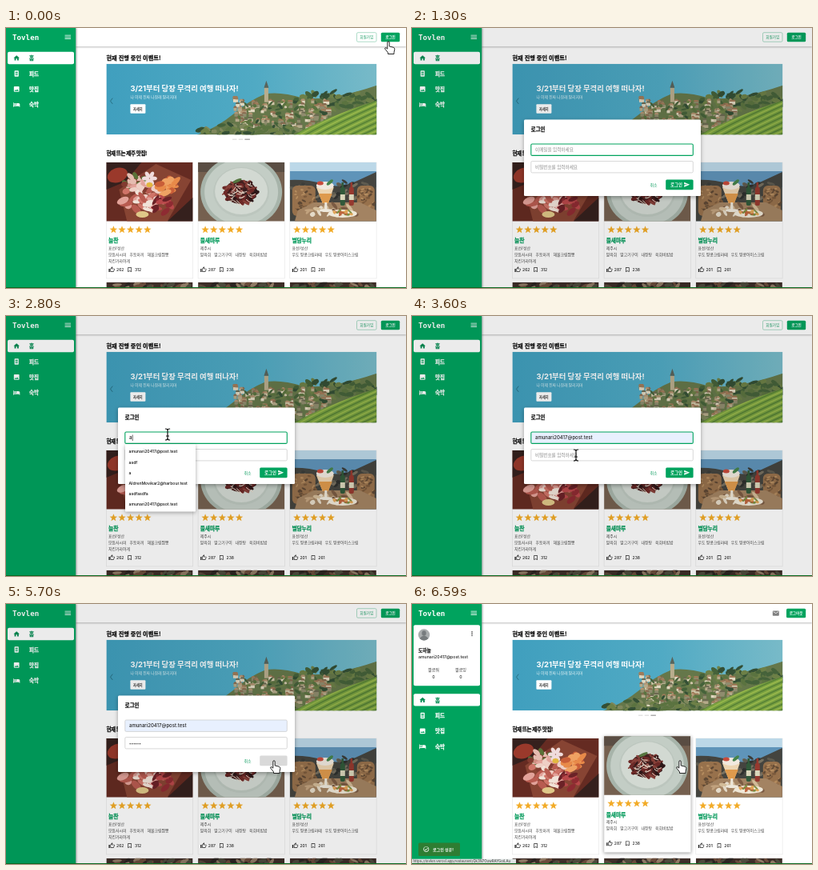
Write an HTML page that moves like this. It is 500 by 325 pixels and loops after 6.78 s.

```html
<!DOCTYPE html>
<html lang="ko">
<head>
<meta charset="utf-8">
<style>
html, body { margin: 0; width: 100%; height: 100%; overflow: hidden; background: #fff; }
svg { display: block; }
text { font-family: Inter, "Noto Sans CJK KR", "Noto Sans CJK", sans-serif; font-weight: 500; white-space: pre; }
.b { font-weight: 700; }
.k { font-family: "Noto Sans CJK KR", "Noto Sans CJK", sans-serif; font-weight: 900; stroke: currentColor; stroke-width: .25; }
.tight { letter-spacing: -.5px; }
.logo { font-family: "DejaVu Sans Mono", monospace; font-weight: 700; }
</style>
</head>
<body>
<svg id="stage" width="500" height="325" viewBox="0 0 500 325"></svg>
<script>
const LOOP = 6780, GREEN = '#00a35e';
const EMAIL = 'amunari20417@post.test';

const ICON = {
  home: 'M10 20v-6h4v6h5v-8h3L12 3 2 12h3v8z',
  feed: 'M7 2h10a2 2 0 0 1 2 2v16a2 2 0 0 1-2 2H7a2 2 0 0 1-2-2V4a2 2 0 0 1 2-2zM8 6v4h8V6zM8 12v2h8v-2zM8 16v2h8v-2z',
  image: 'M21 19V5a2 2 0 0 0-2-2H5a2 2 0 0 0-2 2v14a2 2 0 0 0 2 2h14a2 2 0 0 0 2-2zM8.5 13.5l2.5 3 3.5-4.5 4.5 6H5z',
  bed: 'M7 13a3 3 0 1 0 0-6 3 3 0 0 0 0 6zm12-6h-8v7H3V5H1v15h2v-3h18v3h2v-9a4 4 0 0 0-4-4z',
  menu: 'M3 18h18v-2H3zm0-5h18v-2H3zm0-7v2h18V6z',
  send: 'M2 21L23 12 2 3v7l15 2-15 2z',
  mail: 'M20 4H4a2 2 0 0 0-2 2v12a2 2 0 0 0 2 2h16a2 2 0 0 0 2-2V6a2 2 0 0 0-2-2zm0 4l-8 5-8-5V6l8 5 8-5z',
  mark: 'M17 3H7a2 2 0 0 0-2 2v16l7-3 7 3V5a2 2 0 0 0-2-2zm0 15l-5-2.2L7 18V5h10z',
  thumb: 'M9 21h9c.8 0 1.5-.5 1.8-1.2l3-7.1c.1-.2.2-.5.2-.7v-2a2 2 0 0 0-2-2h-6.3l.9-4.6c.1-.5 0-1-.4-1.4L14.2 1 7.6 7.6C7.2 8 7 8.5 7 9v10a2 2 0 0 0 2 2zM9 9l4.3-4.3L12 10h9v2l-3 7H9zM1 9h4v12H1z',
  more: 'M12 4a2 2 0 1 0 .1 0zM12 10a2 2 0 1 0 .1 0zM12 16a2 2 0 1 0 .1 0z',
  check: 'M12 2a10 10 0 1 0 .1 0zM12 4a8 8 0 1 1-.1 0zM16.6 7.6L10 14.2l-2.6-2.6L6 13l4 4 8-8z'
};

// Markup helpers
const rect = (x, y, w, h, fill, more = '') => `<rect x="${x}" y="${y}" width="${w}" height="${h}" fill="${fill}" ${more}/>`;
const text = (x, y, size, str, fill = '#222', more = '') => `<text x="${x}" y="${y}" font-size="${size}" fill="${fill}" color="${fill}" ${more}>${str}</text>`;
const path = (d, fill, more = '') => `<path d="${d}" fill="${fill}" ${more}/>`;
const oval = (x, y, rx, ry, fill, turn = 0) => `<ellipse cx="${x}" cy="${y}" rx="${rx}" ry="${ry}" fill="${fill}" transform="rotate(${turn} ${x} ${y})"/>`;
const line = (d, color, w) => path(d, 'none', `stroke="${color}" stroke-width="${w}" stroke-linecap="round"`);
const icon = (name, x, y, size, fill) => path(ICON[name], fill, `fill-rule="evenodd" transform="translate(${x} ${y}) scale(${size / 24})"`);
const group = (id, body) => `<g id="${id}">${body}</g>`;
const crop = (x, y, w, h, body) => `<svg x="${x}" y="${y}" width="${w}" height="${h}">${body}</svg>`;
const many = (n, fn) => Array.from({ length: n }, (_, i) => fn(i)).join('');
const B = 'class="b"', K = 'class="k"', MID = ' text-anchor="middle"';

let seed = 17;
const rnd = (a, b) => {
  seed = (seed * 16807) % 2147483647;
  return +(a + (b - a) * seed / 2147483647).toFixed(1);
};
const pick = list => list[Math.floor(rnd(0, list.length - .1))];

// Loose blobs scattered inside an ellipse
const scatter = (n, cx, cy, rx, ry, size, colors) => many(n, () => {
  const a = rnd(0, 6.28), d = Math.sqrt(rnd(0, 1));
  return oval(+(cx + rx * d * Math.cos(a)).toFixed(1), +(cy + ry * d * Math.sin(a)).toFixed(1),
    rnd(size * .6, size * 1.3), rnd(size * .3, size * .6), pick(colors), rnd(-60, 60));
});

const LEAVES = ['#45623a', '#5b7340', '#344f35', '#6d8047'];
function village() {
  const houses = many(130, i => {
    const x = rnd(158, 276), y = 44 + i * .28 + rnd(-3, 3), w = rnd(3, 7);
    return rect(x, y, w, 3.8, pick(['#cfc5a8', '#b5aa8a', '#e0d7bf', '#8f8c6e'])) +
      path(`M${x - .6} ${y}l1.5-2.2h${w - 1.8}l1.5 2.2z`, pick(['#a07a58', '#86694f', '#6d6a52', '#b49472']));
  });
  const rows = many(20, i => line(`M${226 + i * 7} 90Q${262 + i * 8} 68 ${322 + i * 7} 44`, i % 2 ? '#557f35' : '#9ab84c', 1.4));
  return rect(0, 0, 338, 88.5, 'url(#lake)') +
    path('M113 89Q138 80 160 62 178 46 198 38 216 34 246 43 282 46 338 27V89z', '#65774a') +
    scatter(70, 290, 46, 56, 11, 5, LEAVES) + houses + scatter(45, 215, 62, 58, 16, 3.5, LEAVES) +
    rect(197.5, 30, 5, 18, '#b9ad8d') + path('M197 30l3-9 3 9z', '#59645b') +
    scatter(70, 180, 83, 66, 8, 5, [...LEAVES, '#7f875c']) +
    `<g clip-path="url(#vines)">${rect(220, 44, 118, 45, '#78a040')}${rows}</g>`;
}

const slide = () => village() +
  text(30, 34.3, 9.4, '3/21부터 당장 무격리 여행 떠나자!', '#fff', B) +
  text(30, 43.8, 4.8, '나 이제 진짜 나갈래 말리지마', '#e3f2f5') +
  rect(30, 50.5, 19, 11.5, '#fff', 'rx="1"') +
  text(39.5, 57.9, 4.2, '자세히', '#333', B + MID);

// Food pictures, each 108 x 73.5
const sashimi = () => rect(0, 0, 108, 74, '#652b22') +
  path('M0 0H44L24 24 0 34zM76 74L108 44V74z', '#35201d') +
  path('M16 34L62 2 106 22 76 74H26z', '#874433') +
  oval(14, 16, 13, 9, '#9a392b', -20) +
  scatter(24, 38, 28, 16, 12, 6, ['#5a7238', '#e5bcb0', '#cf8b80', '#823b30']) +
  scatter(38, 45, 44, 25, 16, 7, ['#e2a299', '#efcfc5', '#cf7468', '#f1e3d8', '#b85b50']) +
  scatter(18, 77, 30, 13, 10, 7, ['#e88a49', '#efa263', '#c95e38']) +
  scatter(16, 70, 53, 14, 9, 6, ['#8e2b32', '#b8484a', '#6b2227']) +
  many(6, i => oval(54 + 5 * Math.cos(i * 1.05), 20 + 5 * Math.sin(i * 1.05), 4.5, 2.5, '#f0dcdc', i * 60)) +
  oval(54, 28, 4, 3, '#e2b840') + oval(45, 65, 8, 4, '#dfc888');

const beef = () => rect(0, 0, 108, 74, '#75604f') + path('M0 0H108V12H0z', '#5a4d43') +
  oval(54, 37, 51, 45, '#a7b4aa') + oval(54, 37, 46, 41, '#c3cdc5') +
  oval(54, 37, 35, 31, '#bcc6be') + oval(54, 36, 33, 29, '#d2d9d2') +
  oval(53, 37, 20, 15, '#45201f') +
  scatter(60, 53, 37, 20, 15, 4, ['#6d2927', '#391b1c', '#874039', '#2c1718']) +
  many(22, () => { const x = rnd(34, 67), y = rnd(24, 48); return line(`M${x} ${y}q${rnd(-4, 5)} 3 ${rnd(2, 9)} ${rnd(-5, 7)}`, '#e4d5c6', 1); }) +
  oval(49, 23, 6, 2, '#567640', -25);

function seaside() {
  const bottle = (x, c) => rect(x, 31, 6, 23, c, 'rx="2"') + rect(x + 1.7, 25, 2.6, 9, c) + rect(x, 40, 6, 7, '#d9d6bb');
  const chair = (x, w) => rect(x, 29, w, 38, '#97714c', 'rx="6"') +
    scatter(35, x + w / 2, 48, w / 2, 18, 2.5, ['#b48c5f', '#7b5a3c', '#5e4834']);
  return rect(0, 0, 108, 74, '#bcd8e8') + rect(0, 11, 108, 20, '#5f94b9') +
    path('M0 22Q22 21 42 27T82 24L108 12V74H0z', '#44443f') +
    scatter(50, 54, 34, 54, 11, 4, ['#2f302e', '#5e5b50', '#77705f', '#3b3d3a']) +
    chair(3, 29) + chair(84, 22) +
    path('M10 60L30 50H88L108 60V74H6z', '#a38362') +
    scatter(24, 56, 61, 34, 8, 5, ['#e4dac8', '#c1a27e', '#7b5b43', '#d2bb98']) +
    path('M33 31H55L48 51H41z', '#ecd5b2') + path('M36 39H53L48 51H41z', '#de9a4d') +
    rect(43.5, 50, 3, 10, '#eee8db') + oval(45, 60, 8, 2, '#eee8db') +
    oval(44, 29, 11, 5, '#f1e9df') + oval(50, 25, 5, 2, '#45834b', -40) + oval(38, 26, 4, 2.5, '#c74b3c') +
    bottle(63, '#31593a') + bottle(74, '#96392f') +
    oval(66, 64, 18, 5, '#efe8d8') + scatter(14, 66, 63, 12, 3, 3, ['#bd643d', '#7d8f42', '#e0a65a']);
}

const nextDish = () => rect(0, 0, 108, 8, '#3d2d27') +
  scatter(30, 54, 6, 54, 5, 5, ['#2b2421', '#6a4c3b', '#8f7a64', '#4d4a3c']);

const star = cx => '<polygon fill="#f2ab27" points="' + many(10, i => {
  const r = i % 2 ? 2.1 : 5, a = i * Math.PI / 5 - Math.PI / 2;
  return `${(cx + r * Math.cos(a)).toFixed(2)},${(252.2 + r * Math.sin(a)).toFixed(2)} `;
}) + '"/>';

const cards = [
  { name: '늘찬', area: '표선/성산', menu: ['모듬사시미   후토마끼   해물크림짬뽕', '치킨가라아게'], likes: 262, saves: 312, pic: sashimi },
  { name: '들새마루', area: '제주시', menu: ['말육회   말고기구이   내장탕   육회비빔밥'], likes: 287, saves: 238, pic: beef },
  { name: '별담누리', area: '표선/성산', menu: ['우도 땅콩크림라떼   우도 땅콩아이스크림'], likes: 201, saves: 261, pic: seaside }
];

const cardX = i => 125.4 + i * 114.7;
const card = (c, i) => {
  const x = cardX(i), tx = x + 2.7;
  return group('card' + i,
    rect(x, 168, 108.3, 145, '#fff', 'stroke="#e4e4e4" stroke-width=".6" class="edge"') +
    crop(x, 168, 108.3, 73.5, c.pic()) +
    many(5, n => star(x + 9 + n * 10.6)) +
    text(tx, 268.4, 6.8, c.name, '#079b5d', 'class="k" letter-spacing="-.2"') + text(tx, 276.8, 4.9, c.area, '#444') +
    c.menu.map((m, n) => text(tx, 284.6 + n * 8.2, 4.9, m, '#444')).join('') +
    icon('thumb', tx, 298, 8, '#222') + text(tx + 10, 304.2, 5, c.likes) +
    icon('mark', tx + 22.5, 298, 8, '#222') + text(tx + 32.8, 304.2, 5, c.saves));
};

const nav = [['home', '홈'], ['feed', '피드'], ['image', '맛집'], ['bed', '숙박']];
const menu = () => rect(2, 29.8, 83, 15.4, '#fff', 'rx="2"') + nav.map(([name, label], i) => {
  const y = 37.6 + i * 19.4, c = i ? '#fff' : '#078d54';
  return icon(name, 8.7, y - 4.5, 9, c) + text(29, y + 2.6, 6.5, label, c, K);
}).join('');

const stat = (x, label) => text(x, 84, 5.1, label, '#333', MID) + text(x, 93, 5.2, '0', '#333', MID);
const profile = () => rect(2, 26.2, 83, 76, '#fff', 'rx="2"') +
  oval(15, 38.5, 7.2, 7.2, '#a9adae') + oval(15, 36.5, 2.7, 3.2, '#777c7e') + path('M9.5 43Q15 36 20.5 43 15 48 9.5 43z', '#777c7e') +
  icon('more', 70.5, 32.5, 9, '#555') + text(8, 60, 5.7, '도하늘', '#222', K) +
  text(8, 68, 5.2, EMAIL) + stat(27, '팔로워') + stat(61, '팔로잉');

const field = (id, y, hint) => group(id, rect(148.8, y, 202.5, 14.4, '#fff', 'rx="1.5"') +
  text(154, y + 9.2, 5.6, hint, '#8b8b8b') + text(154, y + 9.2, 6, '', '#222') +
  rect(154, y + 3.5, .7, 7.5, '#222'));

const options = [EMAIL, 'asdf', 'a', 'AldrenMovikar2@harbour.test', 'asdfasdfa', 'amunari20417@psot.test'];

const stage = document.getElementById('stage');
stage.innerHTML = `<defs>
  <linearGradient id="lake"><stop offset="0" stop-color="#409fbe"/><stop offset=".55" stop-color="#50aac4"/><stop offset="1" stop-color="#78bac8"/></linearGradient>
  <clipPath id="vines"><path d="M232 90Q274 67 338 46V90z"/></clipPath>
  <filter id="soft" x="-20%" y="-20%" width="140%" height="150%"><feDropShadow dx="0" dy="1.5" stdDeviation="2.5" flood-opacity=".35"/></filter>
</defs>` +
  rect(0, 0, 500, 325, '#fff') +
  text(125.4, 40, 7.2, '현재 진행 중인 이벤트!', '#111', K) +
  crop(125.4, 44.7, 338, 88.5, group('slideA', slide()) + '<use id="slideB" href="#slideA" x="338"/>') +
  line('M133 88l-2.5 3.3 2.5 3.3', '#287083', 1) +
  group('dots', many(3, () => rect(0, 138.6, 5.5, 1.2, '#ddd'))) +
  text(125.4, 159.3, 6.6, '현재 뜨는 제주 맛집!', '#111', 'class="k tight"') +
  many(3, i => crop(cardX(i), 317.8, 108.3, 7.2, nextDish())) +
  card(cards[0], 0) + card(cards[2], 2) + card(cards[1], 1) +
  rect(87, 0, 413, 23, '#fff', 'style="filter:drop-shadow(0 1px 1px #0004)"') +
  group('guest', rect(438.5, 5.7, 24.5, 11.5, '#fff', 'rx="1.5" stroke="#8bcdb0" stroke-width=".7"') +
    text(450.8, 13.4, 4.7, '회원가입', '#159a61', MID) +
    rect(468.8, 5.7, 23.4, 11.5, GREEN, 'rx="1.5"') + text(480.5, 13.3, 4.6, '로그인', '#fff', B + MID)) +
  group('member', icon('mail', 450, 6.8, 9.6, '#808080') +
    rect(468, 5.7, 24.2, 11.5, GREEN, 'rx="1.5"') + text(480.1, 13.3, 4.6, '로그아웃', '#fff', B + MID)) +
  rect(0, 0, 87.2, 325, GREEN, 'style="filter:drop-shadow(1px 0 1px #0005)"') +
  text(8, 14.5, 9.2, 'Tovlen', '#fff', 'class="logo"') + icon('menu', 72.3, 6.2, 10, '#fff') +
  group('profile', profile()) + group('nav', menu()) +
  group('toast', rect(8, 298.5, 52, 16.5, '#2e7d32', 'rx="1.5"') + icon('check', 13.5, 302.2, 8.5, '#fff') +
    text(26, 308.7, 5, '로그인 성공!', '#fff', B)) +
  group('status', rect(0, 318.7, 130, 6.3, '#dfe4e3') +
    text(1.5, 323.4, 4.3, 'https://tovlen.vercel.app/restaurant/Qk3N7OuwRAYGoiLAu', '#555')) +
  group('modal', rect(0, 0, 500, 325, '#000', 'opacity=".08"') +
    rect(140, 114.4, 221, 95.5, '#fff', 'rx="1.5" filter="url(#soft)"') +
    text(148.8, 128.5, 6.4, '로그인', '#111', K) +
    field('mail', 145, '이메일을 입력하세요') + field('pass', 166.5, '비밀번호를 입력하세요') +
    text(297.5, 197.5, 4.9, '취소', '#079b5d') +
    rect(317.2, 189.5, 34.4, 12.7, GREEN, 'rx="1.5" id="submit"') +
    group('submitLabel', text(323, 197.7, 5.4, '로그인', '#fff', B) + icon('send', 339.5, 191.8, 8, '#fff')) +
    group('list', rect(149, 160.3, 88, 84, '#fff', 'rx="1" filter="url(#soft)"') +
      rect(149, 163, 88, 13, '#e9e9e9', 'id="pick"') +
      options.map((o, i) => text(153.5, 171.3 + i * 13.2, 5.1, o, '#111')).join(''))) +
  rect(0, 324, 500, 1, '#0a6a20') +
  group('cursor',
    path('M-1.2 1a1.2 1.2 0 0 1 2.4 0V6l5 1.2q1.8.6 1.6 2.4L7 13.5V15.5H-.5V13.8L-4.2 9.2q-.6-1.6 1-1.7l2 1.6z', '#fff', 'stroke="#111" stroke-width=".9"') +
    path('M0 0V11.5L2.7 9 4.6 13.4 6.6 12.5 4.8 8.3H8.4z', '#000', 'stroke="#fff" stroke-width=".7"') +
    line('M-2.6-7Q0-7 0-5V5Q0 7-2.6 7M2.6-7Q0-7 0-5M2.6 7Q0 7 0 5M-1.5 2H1.5', '#111', 1.2));

const $ = id => document.getElementById(id);
const set = (el, name, value) => el.setAttribute(name, value);
const show = (el, on) => set(el, 'visibility', on ? 'inherit' : 'hidden');
const span = (t, a, b) => Math.min(1, Math.max(0, (t - a) / (b - a)));
const smooth = p => p * p * (3 - 2 * p);
const within = (t, a, b) => t >= a && t < b;

// Same curve as the CSS keyword "ease"
function ease(p) {
  const at = (s, a, b) => 3 * (1 - s) * (1 - s) * s * a + 3 * (1 - s) * s * s * b + s * s * s;
  let lo = 0, hi = 1;
  for (let i = 0; i < 20; i++) {
    const mid = (lo + hi) / 2;
    if (at(mid, .25, .25) < p) lo = mid; else hi = mid;
  }
  return at(lo, .1, 1);
}

const track = [[0, 478, 17], [100, 478, 17], [500, 215, 155], [2500, 215, 155], [2650, 202, 148], [2850, 202, 148],
  [3150, 185, 170], [3350, 185, 170], [3600, 205, 174], [3800, 205, 174], [4000, 238, 190], [4950, 238, 190], [5400, 335, 196], [LOOP, 335, 196]];
const HAND = 0, ARROW = 1, BEAM = 2;
const shapes = [[200, HAND], [450, ARROW], [3000, BEAM], [3400, ARROW], [3850, BEAM], [5250, ARROW], [LOOP, HAND]];
const FIRST_SLIDE = 1750, SLIDE_EVERY = 2050, SLIDE_TIME = 300;
const keys = [3900, 4050, 4250, 4450, 4650, 4850];

function drawField(id, value, focus, hover, filled, caretX, caretOn) {
  const [box, hint, label, caret] = $(id).children;
  set(box, 'stroke', focus ? GREEN : hover ? '#333' : '#c7c7c7');
  set(box, 'stroke-width', focus ? 1.1 : .7);
  set(box, 'fill', filled ? '#e8f0fe' : '#fff');
  show(hint, !value);
  label.textContent = value;
  set(caret, 'x', caretX);
  show(caret, focus && caretOn);
}

function drawCursor(t) {
  const i = track.findIndex(k => k[0] > t), [a, x0, y0] = track[i - 1], [b, x1, y1] = track[i];
  const p = smooth(span(t, a, b)), kind = shapes.find(s => t < s[0])[1];
  set($('cursor'), 'transform', `translate(${x0 + (x1 - x0) * p} ${y0 + (y1 - y0) * p})`);
  show($('cursor'), !within(t, 1300, 2600));
  [...$('cursor').children].forEach((c, n) => show(c, n === kind));
}

function drawBanner(t) {
  const turn = Math.floor((t - FIRST_SLIDE) / SLIDE_EVERY);
  const start = FIRST_SLIDE + turn * SLIDE_EVERY;
  const moving = t < start + SLIDE_TIME;
  set($('slideA'), 'transform', `translate(${moving ? -338 * ease(span(t, start, start + SLIDE_TIME)) : 0} 0)`);
  const active = (turn + 3) % 3;
  let x = 283;
  [...$('dots').children].forEach((d, i) => {
    const w = i === active ? 6.5 : 5.5;
    set(d, 'x', x);
    set(d, 'width', w);
    set(d, 'fill', i === active ? '#999' : '#ddd');
    x += w + 2.2;
  });
}

function draw(t) {
  const member = t >= 5900;
  show($('guest'), !member);
  show($('member'), member);
  show($('profile'), member);
  set($('nav'), 'transform', `translate(0 ${member ? 82.4 : 0})`);

  const open = span(t, 80, 300) * (1 - span(t, 5900, 6100));
  set($('modal'), 'opacity', open);
  show($('modal'), open > 0);

  const typing = within(t, 3900, 5000), blink = t % 1000 >= 500;
  const mail = t < 2700 ? '' : t < 3350 ? 'a' : EMAIL;
  const dots = keys.filter(k => t >= k).length;
  drawField('mail', mail, within(t, 800, 3700), within(t, 500, 800), t >= 3350, mail === 'a' ? 157.8 : 154, blink && t < 3350);
  drawField('pass', '•'.repeat(dots), within(t, 3700, 5600), false, false, 154 + dots * 2.5, typing || blink);
  set($('pass').children[2], 'font-size', 4.6);

  show($('list'), within(t, 2700, 3350));
  show($('pick'), within(t, 3100, 3350));
  set($('submit'), 'fill', t >= 5600 ? '#d9d9d9' : GREEN);
  show($('submitLabel'), t < 5600);

  const lift = smooth(span(t, 6050, 6350));
  set($('card1'), 'transform', `translate(0 ${-2.8 * lift})`);
  $('card1').querySelector('.edge').style.filter = lift ? `drop-shadow(0 1px 2px rgba(0,0,0,${.4 * lift}))` : 'none';
  set($('toast'), 'opacity', span(t, 5950, 6200));
  show($('status'), t >= 6100);
  drawBanner(t);
  drawCursor(t);
}

const held = t => t >= 6590 ? 6590 : Math.min(6400, Math.floor(t / 100) * 100);
const began = performance.now();
function tick() {
  draw(held((performance.now() - began) % LOOP));
  requestAnimationFrame(tick);
}
tick();
</script>
</body>
</html>
```
